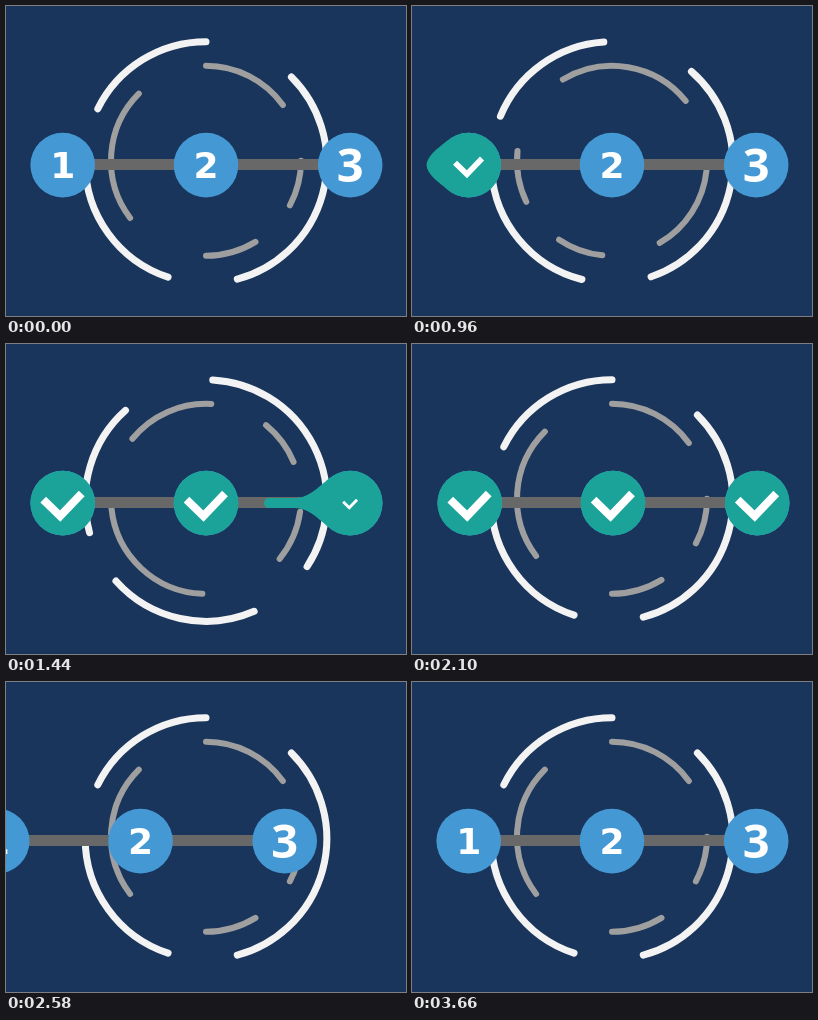
Recreate the animation shown at these times as an HTML page. Size 400x310 px, loop 3910 ms.

```html
<!DOCTYPE html>
<html lang="en">
<head>
<meta charset="utf-8">
<title>Three steps</title>
<style>
  html, body { margin: 0; width: 100%; height: 100%; overflow: hidden; background: #1a355b; }
  svg { display: block; width: 100%; height: 100%; }
  .ring { fill: none; stroke-linecap: round; }
  .digit { fill: #fff; font-weight: 700; text-anchor: middle; }
  .tick { fill: none; stroke: #fff; stroke-width: 8; }
</style>
</head>
<body>
<svg id="stage" viewBox="0 0 400 310"></svg>
<script>
const LOOP = 3910, STEP = 60;
const TEAL = '#1ba39a', BLUE = '#4499d5';
const CY = 159.1, R = 32.3, LINE_Y = 158.5;
const NODES = [56.7, 200, 344.2];
const GAP = 80;                    // bare line between two circles
const FIRST = 824, STAGGER = 278;  // when the liquid reaches each circle
const SLIDE = { start: 2040, time: 780, dist: 562 };

const stage = document.getElementById('stage');
const clamp = v => Math.max(0, Math.min(1, v));
const mix = (a, b, k) => a + (b - a) * k;

function add(parent, tag, attrs) {
  const el = document.createElementNS('http://www.w3.org/2000/svg', tag);
  for (const key in attrs) el.setAttribute(key, attrs[key]);
  parent.appendChild(el);
  return el;
}

// Timing curve with handles (x1, 0) and (x2, 1).
function ease(x, x1, x2) {
  let lo = 0, hi = 1;
  for (let i = 0; i < 30; i++) {
    const s = (lo + hi) / 2, q = 1 - s;
    if (3 * s * q * q * x1 + 3 * s * s * q * x2 + s ** 3 < x) lo = s; else hi = s;
  }
  return lo * lo * (3 - 2 * lo);
}

const cubicInOut = u => u < 0.5 ? 4 * u ** 3 : 1 - 4 * (1 - u) ** 3;

// Spans are degrees clockwise from the top.
function makeRing(cy, r, color, width, spans) {
  const point = deg => {
    const a = deg * Math.PI / 180;
    return `${200 + r * Math.sin(a)} ${cy - r * Math.cos(a)}`;
  };
  const d = spans.map(([a, b]) => `M${point(a)}A${r} ${r} 0 0 1 ${point(b)}`).join('');
  const el = add(stage, 'path', { class: 'ring', d, stroke: color, 'stroke-width': width });
  return deg => el.setAttribute('transform', `rotate(${deg} 200 ${cy})`);
}

function makeRow() {
  const row = add(stage, 'g', {});
  add(row, 'path', { d: `M${NODES[0]} ${LINE_Y}H${NODES[2]}`, stroke: '#686868', 'stroke-width': 11 });
  NODES.forEach((x, i) => {
    add(row, 'circle', { cx: x, cy: CY, r: R, fill: BLUE });
    const low = i === 2;
    add(row, 'text', {
      class: 'digit', x, y: low ? 176.3 : 172,
      'font-size': low ? 47 : 36,
      'font-family': low ? "'Open Sans', 'Noto Sans', sans-serif" : "'DejaVu Sans', sans-serif"
    }).textContent = i + 1;
  });
  return row;
}

function makeFill(row, x) {
  const g = add(row, 'g', { transform: `translate(${x} ${CY})` });
  return {
    stream: add(g, 'path', { fill: TEAL }),
    disc: add(g, 'circle', { fill: TEAL }),
    tick: add(g, 'path', { class: 'tick', d: 'M-19.5-3.5L-2.5 13L19-9.5' })
  };
}

// Liquid reaching from x = a to x = b along the line.
function bar(a, b) {
  return b - a < 1 ? '' : `M${a}-5.5H${b - 5}a5 5 0 0 1 0 10H${a}z`;
}

// Tail that flares into the circle; len is how far it sticks out.
function tail(len) {
  if (len <= 0) return '';
  const k = clamp((len - 10) / 44), h = 5 * k, tip = -R - len;
  const ex = Math.max(tip + h, -56);
  const cx = mix(ex, -40, k), cy = mix(8, h, k);
  return `M-19-26C-32-16.5 ${cx} ${-cy} ${ex} ${-h}H${tip + h}` +
    `A${h} ${h} 0 0 0 ${tip + h} ${h}H${ex}C${cx} ${cy}-32 16.5-19 26z`;
}

function drawFill(fill, t) {
  const start = -R - GAP;
  const grow = clamp(t / 40);
  let d = '';
  if (t > -120 && t < 40) d = bar(start, mix(start, -R, clamp((t + 120) / 120)) + grow * R);
  else if (t >= 40) d = tail(GAP * (1 - clamp((t - 15) / 138)));
  fill.stream.setAttribute('d', d);
  fill.disc.setAttribute('r', R * grow);
  const size = 1 - (1 - clamp(t / 300)) ** 2;
  fill.tick.setAttribute('transform', `scale(${size})`);
  fill.tick.setAttribute('visibility', size > 0 ? 'visible' : 'hidden');
}

add(stage, 'rect', { width: 400, height: 310, fill: '#1a355b' });
const turnInner = makeRing(154.8, 95, '#9f9f9f', 6, [[0, 54], [90, 118], [148.6, 180], [233, 315]]);
const turnOuter = makeRing(156.5, 120.8, '#f3f3f3', 7, [[296.4, 360], [45, 165], [198.3, 270]]);
const doneRow = makeRow(), nextRow = makeRow();
const fills = NODES.map(x => makeFill(doneRow, x));

function draw(t) {
  turnOuter(720 * ease(clamp((t - 170) / 1510), 0.465, 0.605));
  turnInner(1080 * ease(clamp((t - 60) / 1620), 0.686, 0.556));
  fills.forEach((fill, i) => drawFill(fill, t - FIRST - i * STAGGER));
  const shift = SLIDE.dist * cubicInOut(clamp((t - SLIDE.start) / SLIDE.time));
  doneRow.setAttribute('transform', `translate(${shift} 0)`);
  nextRow.setAttribute('transform', `translate(${shift - SLIDE.dist} 0)`);
}

const origin = performance.now();
function tick() {
  const t = (performance.now() - origin) % LOOP;
  draw(Math.floor(t / STEP) * STEP);
  requestAnimationFrame(tick);
}
tick();
</script>
</body>
</html>
```
